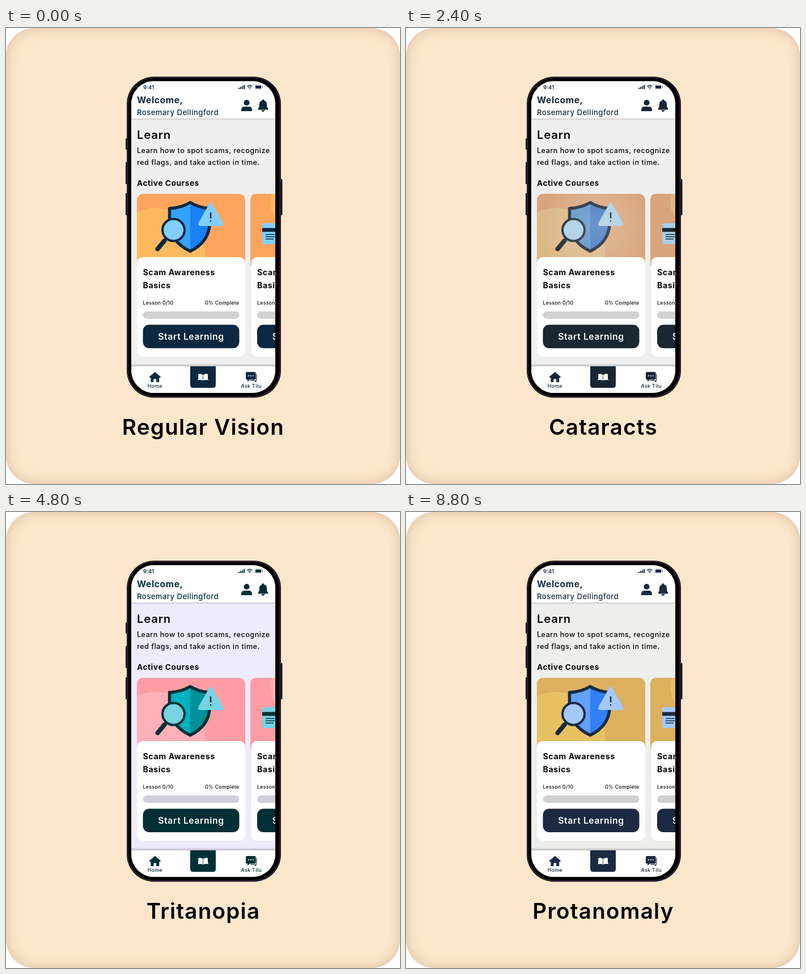
Write an HTML page that moves like this. It is 695 px wide and 806 px high and loops after 9600 ms.

```html
<!DOCTYPE html>
<html lang="en">
<head>
<meta charset="utf-8">
<title>Vision simulation</title>
<style>
html, body { margin: 0; width: 100%; height: 100%; overflow: hidden; background: #fff; }
#panel { position: absolute; inset: 0; border-radius: 50px; background: #fde7cc;
  box-shadow: inset 0 0 22px rgba(110, 75, 30, .27); }
svg { position: absolute; inset: 0; width: 100%; height: 100%; }
text { font-family: Inter, "Open Sans", sans-serif; font-weight: 500; letter-spacing: .04em; fill: #080808; }
.bold { font-weight: 700; }
.semi { font-weight: 600; }
#title { font-size: 38.5px; font-weight: 600; letter-spacing: .033em; text-anchor: middle; fill: #000; }
.mid { text-anchor: middle; }
.end { text-anchor: end; }
.bg { fill: var(--bg); }
.bar { fill: var(--bar); }
.navy { fill: var(--navy); }
.line { stroke: var(--navy); fill: none; }
.card { fill: var(--card); }
.spot { fill: var(--spot); }
.left { fill: var(--left); }
.right { fill: var(--right); }
.pale { fill: var(--pale); }
.white { fill: var(--white); }
.rim { stroke: var(--white); fill: none; }
.blurred { filter: blur(2px); }
.soft { filter: blur(.35px); }
.soft text { font-weight: 400; opacity: .87; }
.soft .bold, .soft .semi { font-weight: 600; opacity: .95; }
</style>
</head>
<body>
<div id="panel"></div>
<svg viewBox="0 0 695 806">
  <defs>
    <clipPath id="screen"><rect x="221" y="94" width="254" height="551" rx="40"/></clipPath>
    <clipPath id="art"><rect x="231" y="293" width="191" height="140" rx="11"/></clipPath>
    <linearGradient id="edge" x1="0" y1="0" x2="0" y2="1">
      <stop offset="0" stop-color="#000" stop-opacity="0"/>
      <stop offset="1" stop-color="#000" stop-opacity=".22"/>
    </linearGradient>
    <radialGradient id="hazeFill">
      <stop offset="0" stop-color="#fff" stop-opacity=".2"/>
      <stop offset=".5" stop-color="#fff" stop-opacity=".13"/>
      <stop offset="1" stop-color="#fff" stop-opacity="0"/>
    </radialGradient>
  </defs>

  <!-- phone body -->
  <g fill="#1b1320">
    <rect x="211" y="195" width="5" height="20" rx="1"/>
    <rect x="211" y="237" width="5" height="39" rx="1"/>
    <rect x="211" y="292" width="5" height="39" rx="1"/>
    <rect x="482" y="267" width="5.5" height="64" rx="1"/>
  </g>
  <rect x="213" y="86" width="272" height="567.5" rx="48" fill="#19121d"/>
  <rect x="215" y="88" width="268" height="563.5" rx="46" fill="#000" stroke="#51475a" stroke-width=".8"/>

  <g clip-path="url(#screen)">
  <g id="app">
    <rect class="bg" x="220" y="93" width="256" height="553"/>
    <rect class="white" x="220" y="93" width="256" height="67"/>
    <rect x="220" y="160" width="256" height="1.2" fill="#000" opacity=".16"/>
    <rect x="220" y="161.2" width="256" height="1.6" fill="#000" opacity=".05"/>

    <!-- status bar -->
    <text class="navy semi" x="242" y="108" font-size="9.4" style="letter-spacing:0">9:41</text>
    <g class="navy">
      <rect x="410" y="105.4" width="2" height="2.6" rx=".5"/>
      <rect x="413.1" y="104" width="2" height="4" rx=".5"/>
      <rect x="416.2" y="102.4" width="2" height="5.6" rx=".5"/>
      <rect x="419.3" y="100.8" width="2" height="7.2" rx=".5"/>
      <rect x="440" y="101.8" width="10.2" height="5.2" rx="1.3"/>
      <rect x="452" y="103.4" width="1" height="2" rx=".5"/>
      <circle cx="429.8" cy="107" r="1.1"/>
    </g>
    <path class="line" stroke-width="1.4" d="M425.3 103.2q4.5-3.8 9 0M427.2 105.2q2.6-2.1 5.2 0"/>
    <rect class="line" x="438.8" y="100.6" width="12.6" height="7.6" rx="2.3" stroke-width=".6" opacity=".5"/>

    <!-- header -->
    <text class="navy bold" x="231" y="133" font-size="15.6">Welcome,</text>
    <text class="navy" x="231" y="154" font-size="13">Rosemary Dellingford</text>
    <g class="navy">
      <circle cx="424.5" cy="132" r="5.1"/>
      <path d="M415 147v-2.2q0-5.8 6-5.8h7q6 0 6 5.8v.7q0 1.5-1.5 1.5z"/>
      <path d="M453.5 126q1.7 0 1.7 2 5 1.3 5 7v3q0 2.6 2 4.2v2.3h-17.4v-2.3q2-1.6 2-4.2v-3q0-5.7 5-7 0-2 1.7-2z"/>
      <path d="M450.6 145.3h5.8q-.4 2.7-2.9 2.7t-2.9-2.7z"/>
    </g>

    <!-- intro -->
    <text class="semi" x="231" y="196" font-size="20.3">Learn</text>
    <text x="231" y="221" font-size="12.6">Learn how to spot scams, recognize</text>
    <text x="231" y="242" font-size="12.6">red flags, and take action in time.</text>
    <text class="bold" x="231" y="278.5" font-size="13.7">Active Courses</text>

    <!-- first course picture -->
    <g clip-path="url(#art)">
      <rect class="card" x="231" y="293" width="191" height="130"/>
      <circle class="spot" cx="265" cy="405" r="87"/>
    </g>
    <path class="left" d="M325 308q-16 10-37 11v24q1 35 37 52z"/>
    <path class="right" d="M325 308q16 10 35 11v24q-1 35-35 52z"/>
    <path class="line" stroke-width="5.5" stroke-linejoin="round" d="M325 308.5q-16 9.500-36.5 10.5v24q1 35 36.5 51.5 34-16.5 34.5-51.5v-24q-18.5-1-34.5-10.5z"/>
    <path class="pale" d="M358 311.5q3-5 6 0l18.5 32q3 6-3 6.5h-36.5q-6-.5-3-6.5z"/>
    <path class="line" stroke-width="2.6" stroke-linecap="round" d="M361 327v8.5M361 341v.2"/>
    <path class="line" stroke-width="8" stroke-linecap="round" d="M279.5 376l-12 14.5"/>
    <path class="line" stroke-width="4" d="M284 370l-5 6"/>
    <circle class="pale" cx="295.5" cy="357" r="19.5"/>
    <circle class="line" cx="295.5" cy="357" r="19.5" stroke-width="4"/>
    <circle id="haze" cx="335" cy="352" r="100" fill="url(#hazeFill)"/>

    <!-- second course picture -->
    <path class="card" d="M431 420v-116q0-11 11-11h40v127z"/>
    <path class="spot" d="M468.5 293q-7 25 8 48v-48z"/>
    <rect class="pale" x="452" y="345" width="40" height="37" rx="4"/>
    <rect class="navy" x="452" y="353.5" width="30" height="6.8"/>
    <path class="line" stroke-width="1.6" stroke-linecap="round" d="M458.5 365h15M458.5 369h15M458.5 373h13"/>

    <g id="cards"></g>

    <!-- bottom bar -->
    <rect x="220" y="593" width="256" height="5" fill="url(#edge)"/>
    <rect class="white" x="220" y="598" width="256" height="48"/>
    <path class="navy" d="M325 598h45v33q0 5-5 5h-35q-5 0-5-5z"/>
    <path class="white" d="M347.2 613q-3.8-2.8-8-1.3v8.8l-1.4 1.9q5-1.2 9.400.6zM348 613q3.800-2.800 8-1.300v8.800l1.400 1.900q-5-1.200-9.400.6z"/>
    <g class="navy">
      <path d="M262.8 608l10.2 8.6-1.3 1.7h-1.5v6.7q0 1-1 1h-4v-5.5h-4.8v5.5h-4q-1 0-1-1v-6.7h-1.5l-1.3-1.7z"/>
      <path d="M425 608h13.5q2 0 2 2v9.5q0 2-2 2h-8.5l-4 3.5v-3.5h-1q-2 0-2-2v-9.5q0-2 2-2z"/>
    </g>
    <path class="line" stroke-width="1.1" d="M441.6 611.5v11h-.8v3l-3-2.6h-6.3"/>
    <path class="rim" stroke-width="2" stroke-linecap="round" d="M428 614.8h.1M431.8 614.8h.1M435.6 614.8h.1"/>
    <text class="navy mid" x="263" y="636" font-size="8.8">Home</text>
    <text class="navy mid" x="432.7" y="636" font-size="8.8">Ask Tilu</text>
  </g>
  </g>
  <text id="title" x="348" y="719"></text>
</svg>
<script>
const HOLD = 800;
const ROLES = ["bg", "bar", "navy", "card", "spot", "left", "right", "pale", "white"];
const REGULAR = "efefef d1d1d1 0b2840 ffa45c ffb85c 33a3ff 1a80f5 82cfff ffffff";

const STATES = [
  ["Regular Vision", REGULAR],
  ["Low Vision", REGULAR, "blurred"],
  ["Glaucoma", "e8e8e8 c6c6c6 072b3b f59f59 efad58 2e9feb 1f7cea 7cc4f0 f7f7f7", "soft"],
  ["Cataracts", "efefef d1d1d1 182733 d8a57c dcb885 5b91c8 4379bd a9cee4 ffffff"],
  ["Achromatopsia", "efefef d1d1d1 252525 b1b1b1 bdbdbd 979797 747474 c2c2c2 ffffff"],
  ["Achromatomaly", "efefef d1d1d1 1d262e cfac90 d5bd98 739cbc 5478a3 a8c7db ffffff"],
  ["Tritanopia", "efebfe d1cddf 003035 ff9da6 ffb0b8 00b1bf 009099 78d3e3 ffffff"],
  ["Tritanomaly", "efecf9 d1ceda 042d39 ffa08b ffb397 13acd6 098aba 7cd2ed ffffff"],
  ["Deuteranopia", "ffe8ee e6c8d1 1d2b47 e2ae57 f3bc60 6a9eff 0082e6 b8c1ff ffffff"],
  ["Deuteranomaly", "f9ebee decbd1 162a44 ecaa59 f7bb5f 56a0ff 0981eb a4c6ff ffffff"],
  ["Protanopia", "eeeeea d0d0cc 242b43 c8b761 d9c665 829ef7 3d7ef5 b9c6f7 ffffff"],
  ["Protanomaly", "eeeeec d0d0ce 1b2a42 dcb05f e7c162 65a0fa 307ff5 a5c9fa ffffff"]
];

const $ = id => document.getElementById(id);

const courseCard = dx => `<g transform="translate(${dx} 0)">
  <rect class="white" x="231" y="405" width="191" height="176" rx="10"/>
  <text class="bold" x="241.5" y="437" font-size="14.2">Scam Awareness</text>
  <text class="bold" x="241.5" y="460" font-size="14.2">Basics</text>
  <text x="241.5" y="488.5" font-size="8.7">Lesson 0/10</text>
  <text class="end" x="411.5" y="488.5" font-size="8.7">0% Complete</text>
  <rect class="bar" x="241.5" y="501" width="170" height="13" rx="6.5"/>
  <rect class="navy" x="241.5" y="524.5" width="170" height="41.5" rx="11"/>
  <text class="white semi mid" x="326.5" y="551" font-size="15.7">Start Learning</text>
</g>`;
$("cards").innerHTML = courseCard(0) + courseCard(201.5);

let shown = -1;

function draw(time) {
  const index = Math.floor(time / HOLD) % STATES.length;
  if (index === shown) return;
  shown = index;
  const [name, colours, effect = ""] = STATES[index];
  const app = $("app");
  colours.split(" ").forEach((c, i) => app.style.setProperty("--" + ROLES[i], "#" + c));
  app.setAttribute("class", effect);
  $("haze").style.display = name === "Cataracts" ? "" : "none";
  $("title").textContent = name;
}

const start = performance.now();
function tick() {
  draw(performance.now() - start);
  requestAnimationFrame(tick);
}
tick();
</script>
</body>
</html>
```
